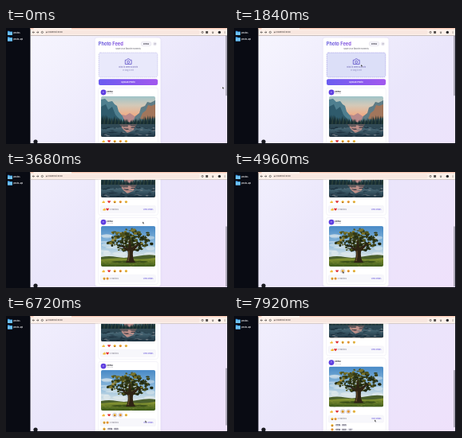
Animation of 278 by 146 pixels, one loop 8 s. Source, as an HTML page:

```html
<!DOCTYPE html>
<html lang="en">
<head>
<meta charset="utf-8">
<title>Photo feed</title>
<style>
html, body { margin: 0; width: 100%; height: 100%; overflow: hidden; background: #080a12; }
svg { display: block; width: 100vw; height: 100vh; }
text { font-family: Inter, "Open Sans", sans-serif; }
</style>
</head>
<body>
<svg id="stage" viewBox="0 0 278 146" preserveAspectRatio="none">
  <defs>
    <linearGradient id="bg" x1="0" y1="0" x2="1" y2="1">
      <stop offset="0" stop-color="#f6f5fe"/><stop offset=".5" stop-color="#eae6fb"/><stop offset="1" stop-color="#efe1fb"/>
    </linearGradient>
    <linearGradient id="violet">
      <stop offset="0" stop-color="#6a5cf0"/><stop offset="1" stop-color="#a257ee"/>
    </linearGradient>
    <linearGradient id="title">
      <stop offset="0" stop-color="#4f46d8"/><stop offset="1" stop-color="#7c3fdd"/>
    </linearGradient>
    <linearGradient id="dusk" x1="0" y1="0" x2="0" y2="1">
      <stop offset="0" stop-color="#9fc3c8"/><stop offset=".22" stop-color="#d3c9b8"/><stop offset=".5" stop-color="#f2a980"/>
    </linearGradient>
    <linearGradient id="lake" x1="0" y1="0" x2="0" y2="1">
      <stop offset="0" stop-color="#5c7480"/><stop offset=".5" stop-color="#41606e"/><stop offset="1" stop-color="#1f3442"/>
    </linearGradient>
    <linearGradient id="day" x1="0" y1="0" x2="0" y2="1">
      <stop offset="0" stop-color="#4789c6"/><stop offset=".45" stop-color="#8fbbdc"/><stop offset=".8" stop-color="#e6ebe8"/>
    </linearGradient>
    <linearGradient id="grass" x1="0" y1="0" x2="0" y2="1">
      <stop offset="0" stop-color="#8d9a35"/><stop offset="1" stop-color="#3c5a1b"/>
    </linearGradient>
    <clipPath id="view"><rect x="30.5" y="9.5" width="246.5" height="135.5"/></clipPath>
    <clipPath id="frame"><rect width="68" height="51" rx="2"/></clipPath>
    <filter id="shade" x="-10%" y="-10%" width="120%" height="120%">
      <feDropShadow dx="0" dy=".5" stdDeviation=".9" flood-color="#6b5aa0" flood-opacity=".16"/>
    </filter>
  </defs>
  <g id="desk"></g>
  <g clip-path="url(#view)"><g id="page"></g></g>
  <g id="chrome"></g>
  <rect id="thumb" x="275.2" width="1.4" rx=".7" fill="#94919c"/>
  <circle cx="37" cy="143" r="2.6" fill="#191a20"/>
  <path id="cursor" d="M0 0V2.7L.7 2.1 1.2 3.2 1.7 3 1.2 1.9 2.1 1.8Z" fill="#111" stroke="#fff" stroke-width=".25"/>
</svg>
<script>
const $ = id => document.getElementById(id);
const NS = 'http://www.w3.org/2000/svg';

function add(parent, tag, attrs, content) {
  const el = document.createElementNS(NS, tag);
  for (const k in attrs) el.setAttribute(k, attrs[k]);
  if (content) el.textContent = content;
  return parent.appendChild(el);
}
const group = (p, x = 0, y = 0) => add(p, 'g', { transform: `translate(${x} ${y})` });
const rect = (p, x, y, width, height, fill, more) => add(p, 'rect', { x, y, width, height, fill, ...more });
const disc = (p, cx, cy, r, fill, more) => add(p, 'circle', { cx, cy, r, fill, ...more });
const oval = (p, cx, cy, rx, ry, fill, more) => add(p, 'ellipse', { cx, cy, rx, ry, fill, ...more });
const path = (p, d, fill, more) => add(p, 'path', { d, fill, ...more });
const label = (p, x, y, size, fill, str, more) =>
  add(p, 'text', { x, y, 'font-size': size, fill, ...more }, str);

function seeded(s) {
  return () => (s = (s * 16807) % 2147483647) / 2147483647;
}

// Desktop and browser bars
function drawDesk() {
  const g = $('desk');
  rect(g, 0, 0, 31, 146, '#090b13');
  [['photos', 6.3], ['photo-api', 13.8]].forEach(([name, y]) => {
    path(g, `M2 ${y - 2.5}h2.2l.7.8h3.1v4.4h-6z`, '#3c9be4');
    rect(g, 2, y - 1, 6, 3.7, '#6fc1f5', { rx: .4 });
    label(g, 9.3, y + .9, 2.5, '#f2f3f6', name, { 'font-weight': 600 });
  });
}

function drawChrome() {
  const g = $('chrome');
  rect(g, 30.5, 0, 246.5, 9.5, '#fdf1ea');
  rect(g, 82, 0, 195, 1.4, '#f8c8b4');
  rect(g, 30.5, 0, 4, 1.4, '#f8c8b4');
  rect(g, 30.5, 9, 246.5, .5, '#ecdfdc');
  const line = { stroke: '#3d3836', 'stroke-width': .65 };
  path(g, 'M34.5 4.2l-1.3 1.2 1.3 1.2M33.2 5.4h2.8M39.6 4.2l1.3 1.2-1.3 1.2M40.9 5.4h-2.8', 'none', line);
  disc(g, 45.4, 5.4, 1.1, 'none', line);
  rect(g, 48.5, 2.7, 194, 5.4, '#f8e7e0', { rx: 2.7 });
  disc(g, 50.8, 5.4, .8, '#6b6360');
  label(g, 52.6, 6.3, 2.6, '#2f2b2a', 'localhost:3000');
  disc(g, 246, 5.4, 1.1, 'none', line);
  rect(g, 250.5, 4.3, 2.2, 2.2, '#55504e', line);
  path(g, 'M259 4.2v2.4M257.8 5.5l1.2 1.1 1.2-1.1', 'none', line);
  disc(g, 267.3, 5.4, 1.7, '#222126');
  [4.2, 5.4, 6.6].forEach(y => disc(g, 274, y, .4, '#333'));
}

// Emoji
const kinds = ['thumb', 'heart', 'laugh', 'wow', 'sad'];
function emoji(p, kind, x, y, s = .92) {
  const g = add(p, 'g', { transform: `translate(${x} ${y}) scale(${s})` });
  if (kind === 'heart') {
    path(g, 'M0 1.8C-3.4-.5-1.6-2.8 0-1.1 1.6-2.8 3.4-.5 0 1.8Z', '#df2f35');
  } else if (kind === 'thumb') {
    path(g, 'M-1.7-.2h1L.1-1.9q.8 0 .6 1.4h1.1q.5.4 0 2.1H-1.7Z', '#f3b72f');
  } else {
    disc(g, 0, 0, 1.8, kind === 'wow' ? '#f2a33a' : '#f5bd3c');
    disc(g, -.65, -.4, .28, '#694117');
    disc(g, .65, -.4, .28, '#694117');
    if (kind === 'laugh') path(g, 'M-1 .3h2q-.2 1.1-1 1.1t-1-1.1Z', '#8c3e20');
    if (kind === 'wow') disc(g, 0, .8, .5, '#8c3e20');
    if (kind === 'sad') {
      path(g, 'M-.7 1.1q.7-.7 1.4 0', 'none', { stroke: '#694117', 'stroke-width': .3 });
      disc(g, -.9, .6, .4, '#58aee6');
    }
  }
}

// Photos, 68 by 51
function lakePhoto(g) {
  rect(g, 0, 0, 68, 51, 'url(#dusk)');
  path(g, 'M18 33L26 23 31 24 36 21 42 25 48 23 55 33Z', '#b98a8b');
  path(g, 'M0 4L5 3 9 7 14 6 17 10 20 12 22 19 27 25 30 33H0Z', '#4f7f8f');
  path(g, 'M0 13L6 10 9 17 14 13 18 23 24 30V33H0Z', '#2f5b6c');
  path(g, 'M68 5L62 8 58 7 55 12 50 14 48 21 43 25 39 33H68Z', '#5f7c85');
  path(g, 'M68 10L63 12 59 11 56 18 52 21 49 28 55 30 68 27Z', '#b8744f', { opacity: .75 });
  rect(g, 0, 33, 68, 18, 'url(#lake)');
  path(g, 'M23 35H45L40 43 33 46 28 42Z', '#dd9a8f', { opacity: .8 });
  const rnd = seeded(71);
  for (let i = 0; i < 46; i++) {
    const x = i * 1.5, edge = Math.abs(x - 35) / 35, h = 2 + edge * 7 + rnd() * 4;
    path(g, `M${x - 1.4} 35L${x} ${34 - h} ${x + 1.4} 35Z`, i % 3 ? '#172d33' : '#2b403a');
    rect(g, x - .8, 35, 1.6, h * .6, '#1c333f', { opacity: .6 });
  }
  for (let i = 0; i < 50; i++) {
    oval(g, rnd() * 68, 39 + rnd() * 12, 1 + rnd() * 2.4, .3 + rnd() * .5,
      i % 3 ? '#172936' : '#7f858c', { opacity: .8 });
  }
}

function treePhoto(g) {
  rect(g, 0, 0, 68, 51, 'url(#day)');
  const rnd = seeded(29);
  for (let i = 0; i < 16; i++) {
    oval(g, rnd() * 68, 12 + rnd() * 24, 4 + rnd() * 7, 1 + rnd() * 2, '#f6f5ef', { opacity: .4 });
  }
  path(g, 'M0 39Q10 37 20 39T45 38 68 37V44H0Z', '#4a5f2c');
  path(g, 'M0 42Q18 39.5 36 41T68 40V51H0Z', 'url(#grass)');
  // Low, broad shadow and ragged crown
  oval(g, 36, 45, 23, 1.6, '#2c3f14', { opacity: .7 });
  const tones = ['#1f2811', '#333a16', '#50531b', '#7d7428', '#a98f37'];
  for (let i = 0; i < 270; i++) {
    const a = rnd() * Math.PI * 2, d = Math.sqrt(rnd()) * (.9 + .1 * Math.sin(a * 7));
    const x = 36 + Math.cos(a) * d * 29, y = 19 + Math.sin(a) * d * (a > Math.PI ? 17 : 13);
    const lit = Math.min(4, Math.floor(rnd() * rnd() * 4 + (30 - y) / 22 + (40 - x) / 60));
    oval(g, x, y, .9 + rnd() * 1.8, .7 + rnd() * 1, tones[Math.max(0, lit)]);
  }
  for (let i = 0; i < 16; i++) {
    oval(g, 14 + rnd() * 44, 23 + rnd() * 7, .5 + rnd(), .4 + rnd() * .5, '#c6d6da');
  }
  path(g, 'M31 46Q34.5 40 33.5 32L22 23 34 28 36 14 38 27 51 20 40 32Q39 41 43 46Z', '#2f2314');
  path(g, 'M34 44Q36 38 35 31', 'none', { stroke: '#765a35', 'stroke-width': .9 });
  for (let i = 0; i < 45; i++) {
    rect(g, rnd() * 68, 42 + rnd() * 9, 2.5, .4, i % 2 ? '#a9a748' : '#2b4715', { opacity: .55 });
  }
}

function post(p, y, height, photo, counts) {
  const g = group(p, 0, y);
  const card = rect(g, 115.7, 0, 74.6, height, '#fff', { rx: 2.5, stroke: '#e9e6f2', 'stroke-width': .5 });
  disc(g, 122, 5.7, 3.4, '#5f3fe0');
  label(g, 122, 6.6, 2.5, '#fff', 'E', { 'text-anchor': 'middle' });
  label(g, 126.2, 5.3, 2.5, '#2b2a35', 'Emma', { 'font-weight': 600 });
  label(g, 126.2, 8, 1.8, '#8f8d99', 'Just now');
  const pic = group(g, 119, 10.7);
  pic.setAttribute('clip-path', 'url(#frame)');
  photo(pic);
  const rings = kinds.map((kind, i) => {
    const x = 122 + i * 7.1;
    const ring = disc(g, x, 67.3, 2.8, '#e3e0ee', { stroke: '#b9b4ca', 'stroke-width': .3, opacity: 0 });
    emoji(g, kind, x, 67.3);
    return ring;
  });
  rect(g, 118.3, 72, 69.2, 9.3, '#f7f7fb', { rx: 1.8, stroke: '#ecebf3', 'stroke-width': .3 });
  counts.forEach((kind, i) => emoji(g, kind, 123 + i * 4.1, 76.7));
  label(g, 129.8, 77.5, 2.1, '#6b6977', '2 reactions');
  const link = label(g, 184.3, 77.5, 2.2, '#5a47d8', 'View details', { 'text-anchor': 'end' });
  return { g, card, rings, link };
}

function drawPage() {
  const p = $('page');
  const back = rect(p, 30, 9.5, 248, 242, 'url(#bg)');
  const shell = rect(p, 111.7, 12.5, 81.8, 236.5, '#fff', { rx: 3, filter: 'url(#shade)' });
  const mid = { 'text-anchor': 'middle' };
  label(p, 115.8, 22.2, 5.7, 'url(#title)', 'Photo Feed', { 'font-weight': 600 });
  rect(p, 169, 17, 13, 5.8, '#f3f2f8', { rx: 2.9, stroke: '#d9d7e3', 'stroke-width': .3 });
  label(p, 175.5, 20.8, 2.3, '#363443', 'Emma', { ...mid, 'font-weight': 600 });
  disc(p, 186.4, 19.9, 2, '#f0eef7', { stroke: '#c5c2d2', 'stroke-width': .3 });
  path(p, 'M185.6 19.9h1.6M186.6 19.2l.7.7-.7.7', 'none', { stroke: '#55505f', 'stroke-width': .35 });
  label(p, 153, 26.9, 2.3, '#56545f', 'Share your favorite moments', mid);
  const drop = rect(p, 116.2, 31, 73.6, 31, '#e9e9fb', {
    rx: 2.2, stroke: '#a6a0de', 'stroke-width': .5, 'stroke-dasharray': '1.5 1'
  });
  const ink = { stroke: '#5649c4', 'stroke-width': .75, 'stroke-linejoin': 'round' };
  path(p, 'M149.3 40.3h1.9l1-1.4h2l1 1.4h1.9v5.2h-7.8z', 'none', ink);
  disc(p, 153.2, 42.8, 1.5, 'none', ink);
  label(p, 153, 50, 2.3, '#5c53a8', 'Click to select a photo', mid);
  label(p, 153, 54, 2.1, '#8580b8', 'or drag it here', mid);
  rect(p, 116, 64.2, 74, 7.8, 'url(#violet)', { rx: 2 });
  label(p, 153, 69.1, 2.7, '#fff', 'Upload Photo', { ...mid, 'font-weight': 600 });
  post(p, 75.3, 84, lakePhoto, ['thumb', 'heart']);
  const tree = post(p, 162.4, 84, treePhoto, ['laugh', 'wow']);

  const details = group(tree.g);
  ['laugh', 'wow'].forEach((kind, i) => {
    const y = 84.8 + i * 5.2;
    emoji(details, kind, 123, y);
    ['Emma', 'Noah', 'Lily'].slice(0, 2 + i).forEach((name, j) => {
      const x = 130.3 + j * 7.7;
      rect(details, x - 3.4, y - 1.6, 6.8, 3.2, '#e4e3ec', { rx: 1.5 });
      label(details, x, y + .7, 1.9, '#454352', name, { ...mid, 'font-weight': 600 });
    });
  });
  return { back, shell, drop, tree, details };
}

drawDesk();
const ui = drawPage();
drawChrome();

// [time, value...] rows, eased between neighbours
const scrollKeys = [[0, 0], [3180, 0], [3580, 105], [6850, 105], [7200, 109.5]];
const cursorKeys = [
  [0, 271, 74], [250, 271, 74], [1450, 159, 46], [2150, 159, 46],
  [2850, 171, 62.5], [3900, 171, 62.5], [4500, 136, 125], [5050, 136, 125],
  [5280, 143, 125], [5500, 143, 125], [5950, 174.3, 131.5], [6900, 174.3, 131.5], [7300, 176, 130.5]
];
const picked = [4560, 5340], openAt = 6080;

function at(keys, t) {
  let i = 0;
  while (i < keys.length - 1 && keys[i + 1][0] <= t) i++;
  const a = keys[i], b = keys[i + 1] || a;
  const u = b === a ? 0 : (t - a[0]) / (b[0] - a[0]);
  const e = u * u * (3 - 2 * u);
  return a.slice(1).map((v, k) => v + (b[k + 1] - v) * e);
}

function draw(t) {
  const [scroll] = at(scrollKeys, t);
  const [x, y] = at(cursorKeys, t);
  const open = t >= openAt;
  const full = open ? 254 : 242;
  $('page').setAttribute('transform', `translate(0 ${-scroll})`);
  $('cursor').setAttribute('transform', `translate(${x} ${y})`);
  ui.back.setAttribute('height', full);
  ui.shell.setAttribute('height', full - 5.5);
  ui.tree.card.setAttribute('height', open ? 95 : 84);
  ui.details.setAttribute('visibility', open ? 'visible' : 'hidden');
  ui.tree.link.textContent = open ? 'Hide details' : 'View details';
  picked.forEach((when, i) => ui.tree.rings[i + 2].setAttribute('opacity', t >= when ? 1 : 0));
  const hover = scroll < 1 && x > 116 && x < 190 && y > 31 && y < 62;
  ui.drop.setAttribute('fill', hover ? '#dcdff8' : '#e9e9fb');
  ui.drop.setAttribute('stroke', hover ? '#8579dc' : '#a6a0de');
  const ratio = 135.5 / full;
  $('thumb').setAttribute('height', 135.5 * ratio);
  $('thumb').setAttribute('y', 9.5 + scroll * ratio);
}

const start = performance.now();
function tick() {
  draw((performance.now() - start) % 8000);
  requestAnimationFrame(tick);
}
tick();
</script>
</body>
</html>
```
